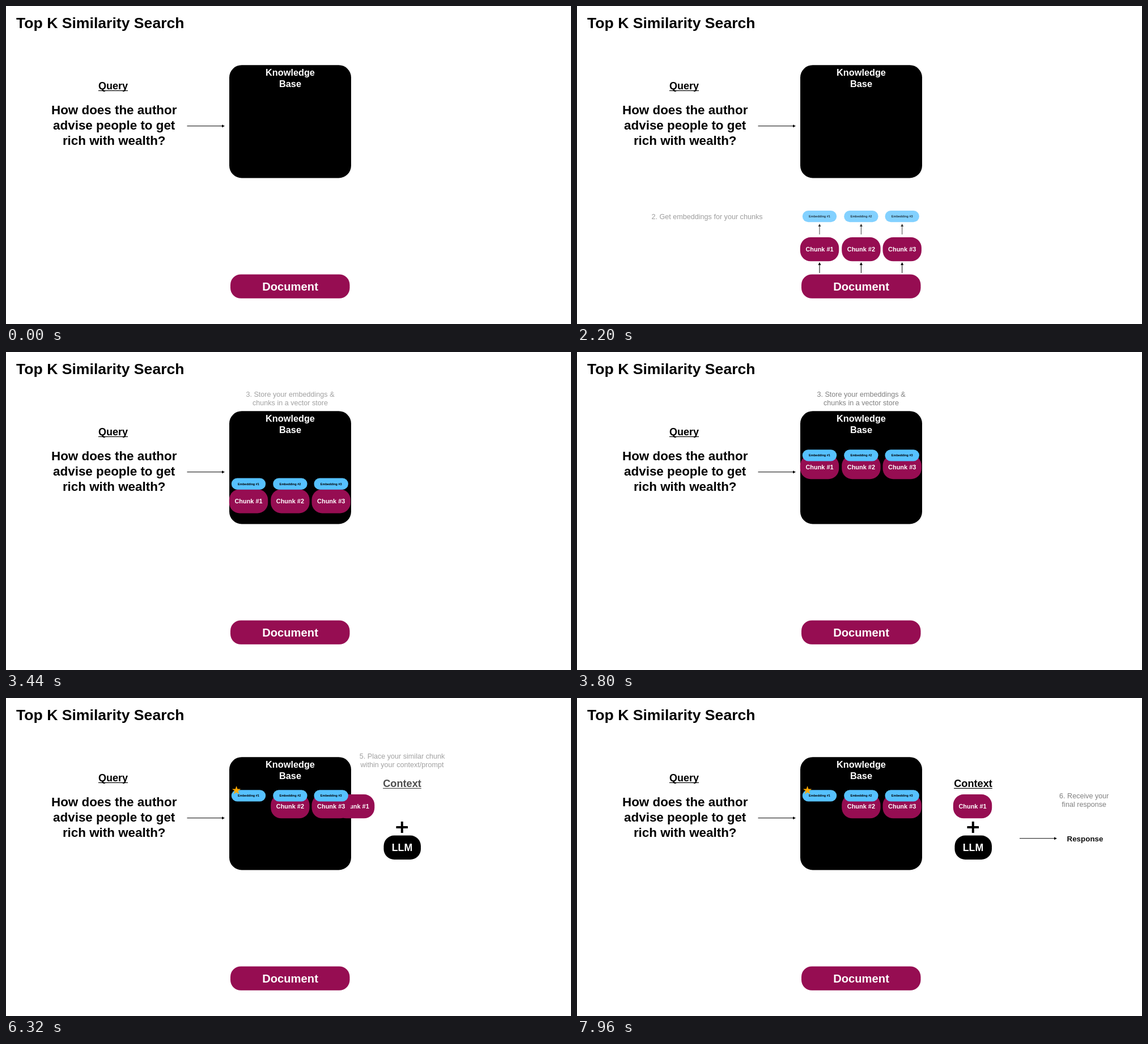
An HTML page with a canvas that plays this animation: 997x561 px, repeating every 8 s.

```html
<!DOCTYPE html>
<html lang="en">
<head>
<meta charset="utf-8">
<title>Top K Similarity Search</title>
<style>
  html, body { margin: 0; width: 100%; height: 100%; overflow: hidden; background: #fff; }
  canvas { display: block; width: 997px; height: 561px; }
</style>
</head>
<body>
<canvas id="stage"></canvas>
<script>
const W = 997, H = 561, LOOP = 8000, TICK = 40, MOVE = 1280;
const PLUM = '#960d52', BLUE = '#56c1ff', GOLD = '#ffa900', NOTE = '#797979';
const COLS = [428, 501.4, 573.7];

// Start time of each slide transition
const START = { split: 180, embed: 1600, store: 2870, find: 4220, place: 5750, reply: 7060 };

const canvas = document.getElementById('stage');
const ctx = canvas.getContext('2d');
const dpr = window.devicePixelRatio || 1;
canvas.width = W * dpr;
canvas.height = H * dpr;

const mix = (a, b, p) => a + (b - a) * p;

// cubic-bezier(.4, 0, .2, 1)
function ease(x) {
  if (x <= 0) return 0;
  if (x >= 1) return 1;
  let lo = 0, hi = 1;
  for (let i = 0; i < 24; i++) {
    const s = (lo + hi) / 2, r = 1 - s;
    if (1.2 * r * r * s + 0.6 * r * s * s + s * s * s < x) lo = s; else hi = s;
  }
  return lo * lo * (3 - 2 * lo);
}

function fade(alpha, draw) {
  if (alpha <= 0) return;
  ctx.save();
  ctx.globalAlpha = Math.min(1, alpha);
  draw();
  ctx.restore();
}

function text(str, x, y, size, { color = '#000', weight = 'bold', align = 'center' } = {}) {
  ctx.font = `${weight} ${size}px "Liberation Sans", Arial, sans-serif`;
  ctx.textAlign = align;
  ctx.fillStyle = color;
  ctx.fillText(str, x, y);
}

function lines(list, x, y, size, step, style) {
  list.forEach((str, i) => text(str, x, y + i * step, size, style));
}

const note = (list, x, y, color = NOTE) =>
  lines(list, x, y, 12.6, 15, { color, weight: 'normal' });

function heading(str, x, y, size) {
  text(str, x, y, size);
  const w = ctx.measureText(str).width;
  ctx.fillRect(x - w / 2, y + 1.8, w, 1.2);
}

function box(x, y, w, h, r, color) {
  ctx.fillStyle = color;
  ctx.beginPath();
  ctx.roundRect(x, y, w, h, r);
  ctx.fill();
}

function arrow(x, y, length, angle) {
  ctx.save();
  ctx.translate(x, y);
  ctx.rotate(angle);
  ctx.fillStyle = '#000';
  ctx.fillRect(0, -0.5, length - 3, 1);
  ctx.beginPath();
  ctx.moveTo(length, 0);
  ctx.lineTo(length - 5, -2.5);
  ctx.lineTo(length - 5, 2.5);
  ctx.fill();
  ctx.restore();
}

const upArrows = y => COLS.forEach(x => arrow(x, y, 19, -Math.PI / 2));

function star(x, y, r) {
  ctx.fillStyle = GOLD;
  ctx.beginPath();
  for (let i = 0; i < 10; i++) {
    const a = i * Math.PI / 5 - Math.PI / 2, d = i % 2 ? r * 0.4 : r;
    ctx.lineTo(x + d * Math.cos(a), y + d * Math.sin(a));
  }
  ctx.fill();
}

function chunk(i, x, y) {
  box(x - 34.2, y, 68.4, 42.3, 18.5, PLUM);
  text(`Chunk #${i + 1}`, x, y + 25.3, 10.95, { color: '#fff' });
}

function embedding(i, y) {
  box(COLS[i] - 30.2, y, 60.4, 20.2, 10.1, BLUE);
  text(`Embedding #${i + 1}`, COLS[i], y + 12, 5.55);
}

function base() {
  text('Top K Similarity Search', 18, 38.5, 26.6, { align: 'left' });
  heading('Query', 189, 147, 18);
  lines(['How does the author', 'advise people to get', 'rich with wealth?'], 190.7, 191, 22.4, 27);
  arrow(319.5, 211.7, 66.5, 0);
  box(394, 104.2, 215, 199.3, 22, '#000');
  lines(['Knowledge', 'Base'], 501.5, 122.6, 16.3, 20, { color: '#fff' });
  box(396, 473.4, 210.5, 42.4, 18.5, PLUM);
  text('Document', 501.5, 502, 20.2, { color: '#fff' });
}

function render(t) {
  const p = {};
  for (const k in START) p[k] = ease((t - START[k]) / MOVE);
  const before = k => t < START[k];

  ctx.setTransform(dpr, 0, 0, dpr, 0, 0);
  ctx.fillStyle = '#fff';
  ctx.fillRect(0, 0, W, H);
  base();

  if (t < 1480) fade(p.split, () => note(['1. Split your document into smaller chunks'], 229.5, 433.8, '#000'));
  if (before('store')) {
    fade(p.split, () => upArrows(471));
    fade(p.embed, () => {
      note(['2. Get embeddings for your chunks'], 229.5, 375.5);
      upArrows(403);
    });
  }
  if (before('find')) fade(p.store, () => note(['3. Store your embeddings &', 'chunks in a vector store'], 501.5, 79));
  if (before('place')) fade(p.find, () => note(['4. Find the chunks most', 'similar to your query'], 321.3, 95.3));

  // The first chunk slides out behind its neighbours
  const top = mix(408, 170, p.store);
  fade(p.split, () => COLS.forEach((x, i) => chunk(i, i ? x : mix(x, 698, p.place), top)));
  fade(p.embed, () => COLS.forEach((x, i) => embedding(i, mix(361, 162.3, p.store))));
  fade(p.find, () => star(406.6, 163, 8));

  fade(p.place, () => {
    heading('Context', 699, 157, 18.2);
    if (before('reply')) note(['5. Place your similar chunk', 'within your context/prompt'], 699, 107.4);
  });
  fade(p.place * 1.8, () => {
    ctx.fillStyle = '#000';
    ctx.fillRect(688.5, 226, 20.5, 4);
    ctx.fillRect(696.8, 218, 4, 20);
    box(666.5, 242.6, 65.5, 42.4, 18.5, '#000');
    text('LLM', 699, 270.3, 17.8, { color: '#fff' });
  });

  fade(p.reply, () => {
    note(['6. Receive your', 'final response'], 894.8, 177.2);
    arrow(781, 247.7, 66, 0);
    text('Response', 896.5, 252.8, 13.4);
  });
}

const origin = performance.now();
function loop() {
  const t = (performance.now() - origin) % LOOP;
  render(Math.floor(t / TICK) * TICK);
  requestAnimationFrame(loop);
}
loop();
</script>
</body>
</html>
```
